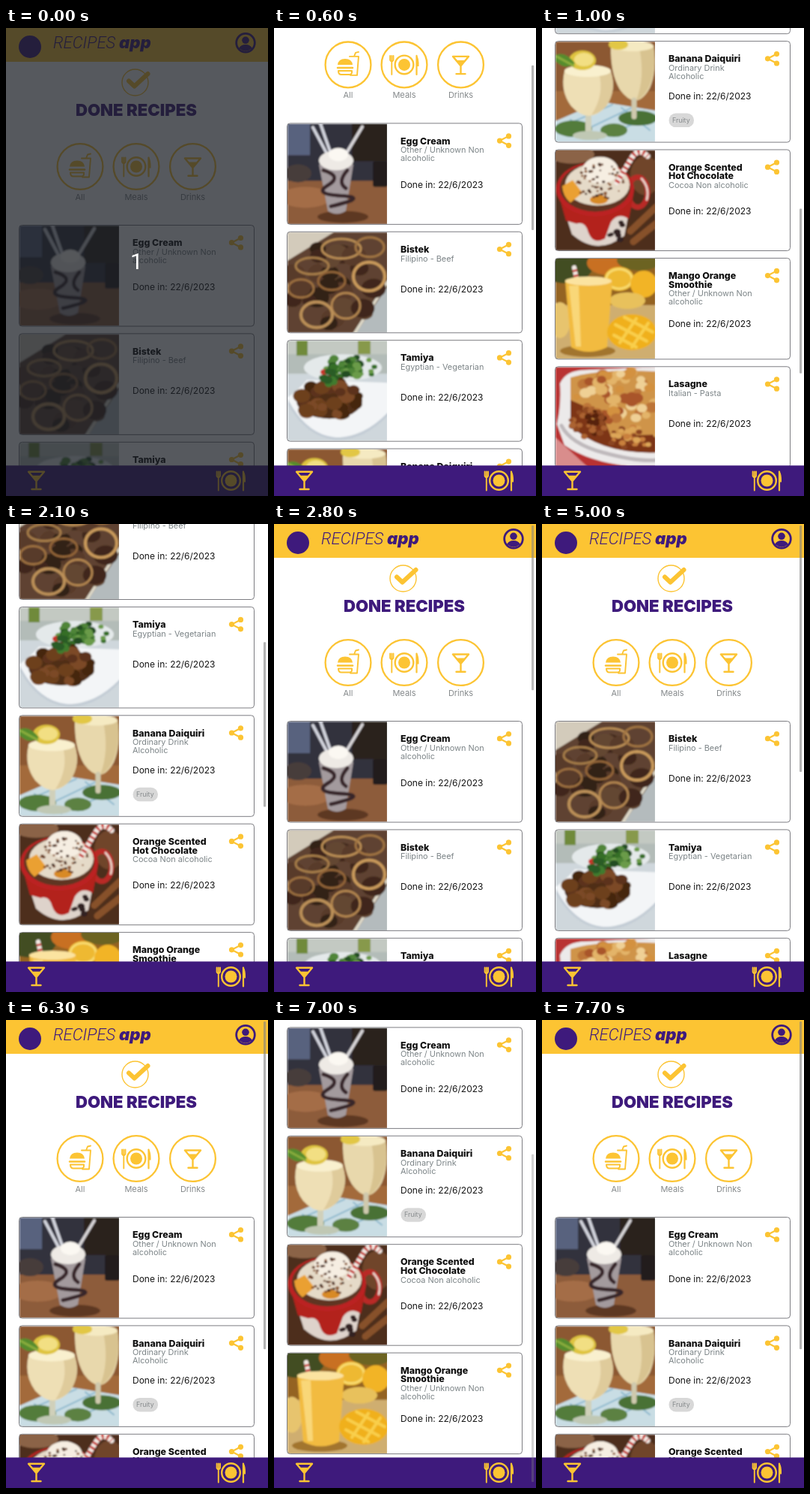
An HTML page that plays this animation: 350 px wide and 623 px high, repeating every 8000 ms.

```html
<!DOCTYPE html>
<html lang="en">
<head>
<meta charset="utf-8">
<title>Done recipes</title>
<style>
  html, body { margin: 0; height: 100%; overflow: hidden; background: #fff; }
  svg { display: block; }
  text { font-family: Inter, sans-serif; }
  .title { font-size: 12.4px; font-weight: 800; fill: #111; }
  .kind { font-size: 10.9px; fill: #7c8487; }
  .done { font-size: 12px; fill: #151515; }
  .tag { font-size: 8.8px; fill: #85898b; }
  .label { font-size: 11px; fill: #85898b; text-anchor: middle; }
  .heading { font-size: 22.1px; font-weight: 900; fill: #3e1a7c; text-anchor: middle; }
  .brand { font: italic 300 22px Roboto, sans-serif; fill: #3e1a7c; }
  .bold { font: italic 900 22px Inter, sans-serif; fill: #3e1a7c; }
  .count { font: 400 30px Roboto, sans-serif; fill: #fff; text-anchor: middle; }
</style>
</head>
<body>
<svg id="stage" width="350" height="623" viewBox="0 0 350 623"></svg>
<script>
const YELLOW = '#fcc433', PURPLE = '#3e1a7c';
const CARD_TOP = 262.5, PITCH = 144.4, LOOP = 8000;

const oval = (x, y, rx, ry, fill) => `<ellipse cx="${x}" cy="${y}" rx="${rx}" ry="${ry}" fill="${fill}"/>`;
const ring = (x, y, rx, ry, color, w) =>
  `<ellipse cx="${x}" cy="${y}" rx="${rx}" ry="${ry}" fill="none" stroke="${color}" stroke-width="${w}"/>`;
const box = (x, y, w, h, fill, more = '') => `<rect x="${x}" y="${y}" width="${w}" height="${h}" fill="${fill}" ${more}/>`;
const shape = (d, fill) => `<path d="${d}" fill="${fill}"/>`;
const line = (d, color, w) => `<path d="${d}" fill="none" stroke="${color}" stroke-width="${w}" stroke-linecap="round" stroke-linejoin="round"/>`;
const text = (cls, x, y, str) => `<text class="${cls}" x="${x}" y="${y}">${str}</text>`;
const at = (x, y, body) => `<g transform="translate(${x} ${y})">${body}</g>`;

// Seeded dots inside an ellipse
function scatter(count, cx, cy, rx, ry, size, colors) {
  let seed = count * 7919 + cx, out = '';
  const random = () => (seed = (seed * 16807 + 11) % 2147483647) / 2147483647;
  random(); random();
  for (let i = 0; i < count; i++) {
    const a = random() * 2 * Math.PI, r = Math.sqrt(random()), s = size * (.7 + .6 * random());
    out += oval((cx + rx * r * Math.cos(a)).toFixed(1), (cy + ry * r * Math.sin(a)).toFixed(1),
      s.toFixed(1), (s * .8).toFixed(1), colors[i % colors.length]);
  }
  return out;
}
const backdrop = (top, bottom, split) => box(0, 0, 134, 134, top) + box(0, split, 134, 134 - split, bottom);
const straw = (d, w) => line(d, '#f4ece6', w) +
  `<path d="${d}" fill="none" stroke="#c4322c" stroke-width="${w}" stroke-dasharray="3 4"/>`;

const photos = {
  eggCream: backdrop('#33313d', '#8d5c3b', 76) + box(0, 0, 30, 42, '#59627e') + box(86, 0, 48, 50, '#29211f') +
    oval(14, 66, 18, 12, '#473c3b') + oval(24, 98, 34, 14, '#a46d46') + oval(74, 124, 34, 8, '#5d3923') +
    box(114, 50, 20, 34, '#221d1d', 'rx="3"') + line('M34 5L58 50M44 0L58 40', '#d3d5de', 4) + line('M100 4L77 42', '#d8d6d8', 4) +
    shape('M42 54L88 54L78 116Q66 124 54 116Z', '#a39a9d') + line('M48 62Q74 70 54 82T72 96T58 110M80 62Q66 78 78 86', '#38272a', 5) +
    oval(65, 49, 23, 13, '#eeeae5') + oval(68, 41, 13, 9, '#fbf8f2'),
  bistek: box(0, 0, 134, 134, '#5f4330') + shape('M0 0H62L0 38Z', '#d3cbbb') + shape('M134 72V134H92Z', '#b4bbbd') +
    line('M134 66L90 134', '#ded9c9', 4) + scatter(26, 62, 72, 60, 56, 13, ['#41281d', '#593a2a', '#634632', '#332119']) +
    ring(72, 22, 26, 13, '#b98d55', 3) + ring(109, 59, 21, 19, '#c99a5c', 4) + ring(33, 45, 22, 11, '#a67d49', 3) +
    ring(78, 98, 19, 17, '#b28550', 3) + ring(18, 75, 17, 12, '#9c703f', 3) + ring(59, 65, 18, 12, '#936539', 3) +
    ring(39, 110, 21, 17, '#bb9058', 4) + ring(110, 20, 19, 13, '#a17443', 3),
  tamiya: backdrop('#b3bcb8', '#cfd7dc', 44) + box(0, 0, 134, 18, '#c3c9c2') + box(12, 0, 15, 20, '#6f8a3a') + box(94, 0, 17, 18, '#87994c') +
    oval(74, 36, 52, 18, '#e4e9ea') + shape('M0 76Q18 62 26 52L134 56V96Q104 128 60 130Q20 120 0 76Z', '#f3f5f7') + line('M2 84Q26 126 62 130T134 98', '#c3ccd5', 3) +
    scatter(60, 84, 36, 36, 15, 5, ['#356e28', '#4f8539', '#244e20', '#6a9b48']) +
    oval(56, 80, 44, 24, '#4f2d18') + scatter(36, 56, 79, 40, 25, 9, ['#5b331b', '#6d401f', '#45260f', '#7c4a26']) + oval(49, 42, 5, 4, '#c9342a') +
    scatter(14, 58, 50, 13, 9, 5, ['#3f7b2f', '#2b5c25']),
  daiquiri: backdrop('#8c5831', '#a36b3b', 66) + shape('M0 106L60 80L134 92V134H0Z', '#c9dde4') +
    line('M2 116L76 84M22 126L102 88M70 124L132 98M20 104L56 130M88 88L126 118', '#8db8cd', 2) +
    oval(110, 102, 26, 10, '#487136') + shape('M74 6H131Q136 38 126 62Q108 94 86 64Q73 42 74 6Z', '#e8d8ac') + line('M105 78V100', '#cfc9ad', 7) +
    shape('M112 8H131Q135 38 124 62Q116 76 108 78Q120 48 112 8Z', '#d8c390') + oval(103, 6, 28, 7, '#f5eac2') + oval(84, 4, 13, 7, '#e2c745') +
    oval(24, 116, 25, 11, '#527c3a') + oval(78, 118, 18, 9, '#5b8143') + line('M44 96V122', '#d0d0ba', 8) + oval(46, 125, 23, 6, '#c0c8b4') +
    shape('M12 40H74Q82 64 68 86Q45 112 21 86Q6 66 12 40Z', '#eedfb5') + shape('M58 42H74Q82 64 68 86Q60 95 48 98Q66 70 58 42Z', '#dfcb9b') + oval(43, 39, 31, 8, '#f9f0ce') +
    oval(36, 25, 18, 13, '#dfc440') + oval(38, 24, 13, 9, '#f2df83') + shape('M0 18Q13 12 26 29Q13 39 0 26Z', '#568c2d') + line('M2 20L24 32', '#8aad3c', 3),
  hotChocolate: box(0, 0, 134, 134, '#4d2e1d') + oval(22, 6, 30, 12, '#8b6446') + oval(120, 34, 20, 26, '#70452a') + line('M100 108L134 76M104 122L134 98', '#87512a', 9) +
    ring(110, 56, 13, 20, '#b92a27', 7) + line('M115 38Q126 50 122 66', '#e8d2c8', 3) + shape('M6 62H102L92 114Q56 142 22 112Z', '#ded3cb') +
    shape('M4 58Q52 96 104 60L98 92Q84 82 74 96L66 118Q50 126 44 110Q40 94 28 98L14 94Z', '#b3201f') +
    scatter(7, 82, 108, 12, 14, 4, ['#302020']) + oval(53, 52, 52, 36, '#bb2422') + oval(53, 50, 47, 32, '#5f3520') + oval(56, 46, 43, 28, '#e5dac8') +
    oval(60, 27, 24, 18, '#f6eee2') + shape('M9 48L23 40L36 57L20 70Q10 62 9 48Z', '#eaa032') + oval(58, 66, 12, 6, '#d88a27') +
    scatter(60, 58, 42, 34, 24, 1.9, ['#66381f', '#8c5730', '#43271b']) + straw('M82 43L102 10Q111 -4 123 8', 7),
  smoothie: backdrop('#946323', '#cfae70', 62) + oval(14, 10, 36, 23, '#434e21') + oval(72, 6, 30, 16, '#c86f22') + oval(112, 2, 30, 14, '#6c6324') +
    oval(85, 27, 20, 16, '#eeb933') + ring(85, 27, 17, 13, '#f8db70', 3) + oval(118, 34, 18, 18, '#f2b425') + oval(6, 82, 14, 24, '#e7c46e') + oval(96, 56, 24, 11, '#e8c15c') +
    oval(43, 123, 37, 8, '#a2742f') + straw('M32 45L25 12', 6) + shape('M13 29H76L69 118Q44 130 21 118Z', '#f2bb3f') + shape('M18 36H31L34 117H27Z', '#f9d778') +
    oval(44, 30, 31, 6, '#fbe3a0') + oval(102, 98, 33, 24, '#f0b01c') + line('M80 88L122 110M92 78L130 98M78 102L108 118M86 112L108 80M102 118L124 86', '#f9cf4c', 4),
  lasagne: box(0, 0, 134, 134, '#b93132') + shape('M0 94L44 134H0Z', '#d98d8c') +
    shape('M6 22Q14 4 40 4L134 0V132H98Q44 126 12 104L2 76Q8 50 6 22Z', '#eceaea') + line('M8 78Q20 102 64 114T134 124', '#bfb9bc', 5) +
    shape('M20 14Q60 2 134 6V114Q64 114 20 78Z', '#cf9448') + shape('M20 44L62 62L74 92L134 90V114Q60 116 20 78Z', '#7d3519') +
    scatter(60, 82, 40, 56, 36, 7, ['#e3b469', '#bd7537', '#efd095', '#d3913f', '#a9552a']) + scatter(34, 44, 74, 24, 20, 4, ['#8f4823', '#57220f', '#ac6430']) +
    scatter(30, 102, 94, 34, 14, 4, ['#c9803d', '#8b4421', '#dda659']),
  kedgeree: box(0, 0, 134, 134, '#3b2117') + oval(25, 1, 24, 8, '#956b48') + oval(75, 0, 22, 7, '#b18a62') + oval(119, 3, 18, 8, '#805539') +
    oval(65, 76, 66, 50, '#1b1814') + oval(66, 74, 60, 43, '#b88a22') + scatter(160, 66, 74, 57, 40, 3, ['#d9ad33', '#a87518', '#e6c64f', '#c4951f']) +
    scatter(70, 64, 73, 48, 35, 3, ['#35642a', '#5d7d28', '#254d20']) +
    [[56, 46], [92, 45], [30, 84], [108, 82], [74, 106], [44, 62]].map(([x, y]) => oval(x, y, 11, 6, '#f3eee0') + oval(x + 1, y, 6, 3.5, '#e5a426')).join(''),
  stroganoff: box(0, 0, 134, 134, '#3a3426') + box(0, 0, 134, 20, '#6b5a43') + shape('M0 100L134 96V134H0Z', '#55504b') + oval(60, 74, 82, 50, '#d3d0ca') + oval(62, 70, 72, 42, '#e9e6de') +
    line('M104 42L132 58M100 52L131 68', '#5c6b2f', 6) + scatter(60, 62, 78, 58, 28, 7, ['#cdb96c', '#dccb8a', '#b9a352']) +
    scatter(80, 62, 58, 48, 26, 7, ['#a9937a', '#84705a', '#c2b09a', '#95806a']) + line('M66 134L134 100M84 134L134 112', '#9d9b9e', 5),
  chicken: box(0, 0, 134, 134, '#7a4316') + shape('M84 0H134V56Z', '#d3cdb8') + oval(126, 15, 16, 14, '#7c8f50') + oval(34, 116, 56, 26, '#cf9a22') + oval(119, 108, 34, 28, '#d1a03c') +
    shape('M10 62Q27 17 84 14Q124 28 126 68Q108 112 60 106Q14 98 10 62Z', '#b96b1e') + oval(82, 43, 36, 27, '#cd8129') +
    scatter(90, 70, 62, 50, 40, 5, ['#d6983a', '#a9571a', '#c67c28', '#dba64c']) + oval(64, 82, 13, 10, '#4e2a15') + oval(35, 53, 9, 7, '#874415') +
    line('M0 8L38 42M0 24L34 50M0 40L30 62', '#a8a29c', 4) + line('M92 112L134 78', '#e3d6ae', 5),
};

// photo, title lines, kind lines, is a drink, tag, tag width
const recipes = [
  ['eggCream', ['Egg Cream'], ['Other / Unknown Non', 'alcoholic'], true],
  ['bistek', ['Bistek'], ['Filipino - Beef'], false],
  ['tamiya', ['Tamiya'], ['Egyptian - Vegetarian'], false],
  ['daiquiri', ['Banana Daiquiri'], ['Ordinary Drink', 'Alcoholic'], true, 'Fruity', 33.5],
  ['hotChocolate', ['Orange Scented', 'Hot Chocolate'], ['Cocoa Non alcoholic'], true],
  ['smoothie', ['Mango Orange', 'Smoothie'], ['Other / Unknown Non', 'alcoholic'], true],
  ['lasagne', ['Lasagne'], ['Italian - Pasta'], false],
  ['kedgeree', ['Smoked Haddock', 'Kedgeree'], ['Indian - Breakfast'], false, 'Brunch,Fish,Fusion', 91],
  ['stroganoff', ['Beef stroganoff'], ['Russian - Beef'], false],
  ['chicken', ['Ayam Percik'], ['Malaysian - Chicken'], false],
];

const share = line('M313.5 17L301.5 23.2L313.5 29.4', YELLOW, 2.2) +
  [[301.5, 23.2], [313.5, 17], [313.5, 29.4]].map(([x, y]) => oval(x, y, 3.6, 3.6, YELLOW)).join('');

function card([photo, title, kind, , tag, tagWidth]) {
  const kindTop = 39.5 + 11.5 * (title.length - 1);
  const doneY = tag ? 77 : 80.5 + 5.5 * (title.length + kind.length - 2);
  return `<g class="card"><g transform="translate(18 .5)" clip-path="url(#photo)"><g filter="url(#soft)">${photos[photo]}</g></g>` +
    box(17.5, 0, 314, 134.5, 'none', 'rx="4" stroke="#7d7d82"') + share +
    title.map((s, i) => text('title', 169, 27.7 + 11.7 * i, s)).join('') +
    kind.map((s, i) => text('kind', 169, kindTop + 10.8 * i, s)).join('') +
    text('done', 169, doneY, 'Done in: 22/6/2023') +
    (tag ? box(169.5, 96, tagWidth, 18.5, '#d8d8d8', 'rx="9.2"') + text('tag', 174, 108, tag) : '') + '</g>';
}

const plate = ring(0, 0, 12.3, 12.3, YELLOW, 2.4) + oval(0, 0, 8, 8, YELLOW) +
  line('M-16.7 -4V13M-18.9 -12V-6Q-16.7 -2 -14.5 -6V-12M-16.7 -12V-5', YELLOW, 1.9) +
  line('M16.5 13V-12', YELLOW, 2.2) + shape('M16 -13Q20 -10 19.5 2H16Z', YELLOW);
const cocktail = line('M-10.5 -11H10.5L0 1.5ZM0 1V12M-6 12.2H6', YELLOW, 2.4) + shape('M-7 -6H7L0 2Z', YELLOW);
const burger = line('M2 -11H14L12 14H3M8 -11L10 -16L14 -17', YELLOW, 1.9) +
  box(-15, -7, 20, 20, '#fff', 'rx="5"') + shape('M-14 0Q-13 -8 -4 -8T6 0Z', YELLOW) +
  line('M-14 4H6', YELLOW, 2.5) + line('M-13 8H5V10Q5 13 1 13H-9Q-13 13 -13 8Z', YELLOW, 2);

const header = box(0, 0, 350, 45, YELLOW) + oval(32, 25, 15, 15, PURPLE) +
  text('brand', 63, 27, 'RECIPES') + text('bold', 151, 27, 'app') +
  ring(320, 19.7, 12.3, 12.3, PURPLE, 2.8) + oval(320, 16.3, 4.8, 4.8, PURPLE) + shape('M311 27Q314 22 320 22T329 27Q320 34 311 27Z', PURPLE);
const filters = [['All', 99, burger], ['Meals', 174, plate], ['Drinks', 249.5, cocktail]].map(([name, x, icon]) =>
  ring(x, 184.5, 30.4, 30.4, YELLOW, 2.3) + at(x, 184.5, icon) + text('label', x, 229, name)).join('');
const intro = ring(172.5, 72.5, 17.5, 17.5, YELLOW, 1.4) + line('M164 70.5L171.5 77.5L189.5 61', YELLOW, 6) +
  text('heading', 174, 117.3, 'DONE RECIPES');

document.getElementById('stage').innerHTML =
  `<defs><clipPath id="photo"><rect width="133" height="133.5"/></clipPath>` +
  `<filter id="soft"><feGaussianBlur stdDeviation=".9"/></filter></defs>` +
  `<g id="page">${header}${intro}${filters}${recipes.map(card).join('')}</g>` +
  box(0, 582.4, 350, 41, PURPLE) + at(40.5, 601.8, cocktail) + at(300.5, 602.5, plate) +
  box(344, 2, 3.2, 0, '#808080', 'id="thumb" rx="1"') +
  `<g id="veil">${box(0, 0, 350, 623, '#1b2027', 'opacity=".74"')}${text('count', 174.5, 321, '1')}</g>`;

const [page, thumb, veil] = ['page', 'thumb', 'veil'].map(id => document.getElementById(id));
const cards = [...document.querySelectorAll('.card')];

// [ms, share of the scroll range]
const scrollKeys = [[0, 0], [500, 0], [1000, .606], [1200, 1], [1400, 1], [2100, .394], [2200, .394], [2500, 0], [3500, 0],
  [3800, 1], [4700, 1], [5000, 0], [6300, 0], [6600, 1], [7400, 1], [7700, 0], [LOOP, 0]];
const thumbShown = [[500, 2800], [3500, 4100], [4700, 5200], [6300, 6900], [7400, LOOP]];

function scrollAt(t) {
  const i = scrollKeys.findIndex(key => key[0] > t);
  const [t0, y0] = scrollKeys[i - 1], [t1, y1] = scrollKeys[i];
  return y0 + (y1 - y0) * (t - t0) / (t1 - t0);
}
function thumbAlpha(t) {
  const span = thumbShown.filter(([from]) => from <= t).pop();
  if (!span) return 0;
  return t < span[1] ? 1 : Math.max(0, .9 - (t - span[1]) * .003);
}

function draw(now) {
  const t = Math.floor(now % LOOP / 100) * 100; // the screen steps ten times a second
  const shown = recipes.map(r => t < 3200 || r[3] === t >= 5900);
  let count = 0;
  cards.forEach((c, i) => {
    c.setAttribute('display', shown[i] ? 'inline' : 'none');
    if (shown[i]) c.setAttribute('transform', `translate(0 ${CARD_TOP + PITCH * count++})`);
  });
  const range = PITCH * count - 325, part = scrollAt(t), size = 613 * 623 / (range + 623);
  page.setAttribute('transform', `translate(0 ${-range * part})`);
  thumb.setAttribute('y', 2 + (613 - size) * part);
  thumb.setAttribute('height', size);
  thumb.setAttribute('opacity', .6 * thumbAlpha(t));
  veil.setAttribute('display', t < 100 ? 'inline' : 'none');
  requestAnimationFrame(draw);
}
draw(0);
</script>
</body>
</html>
```
